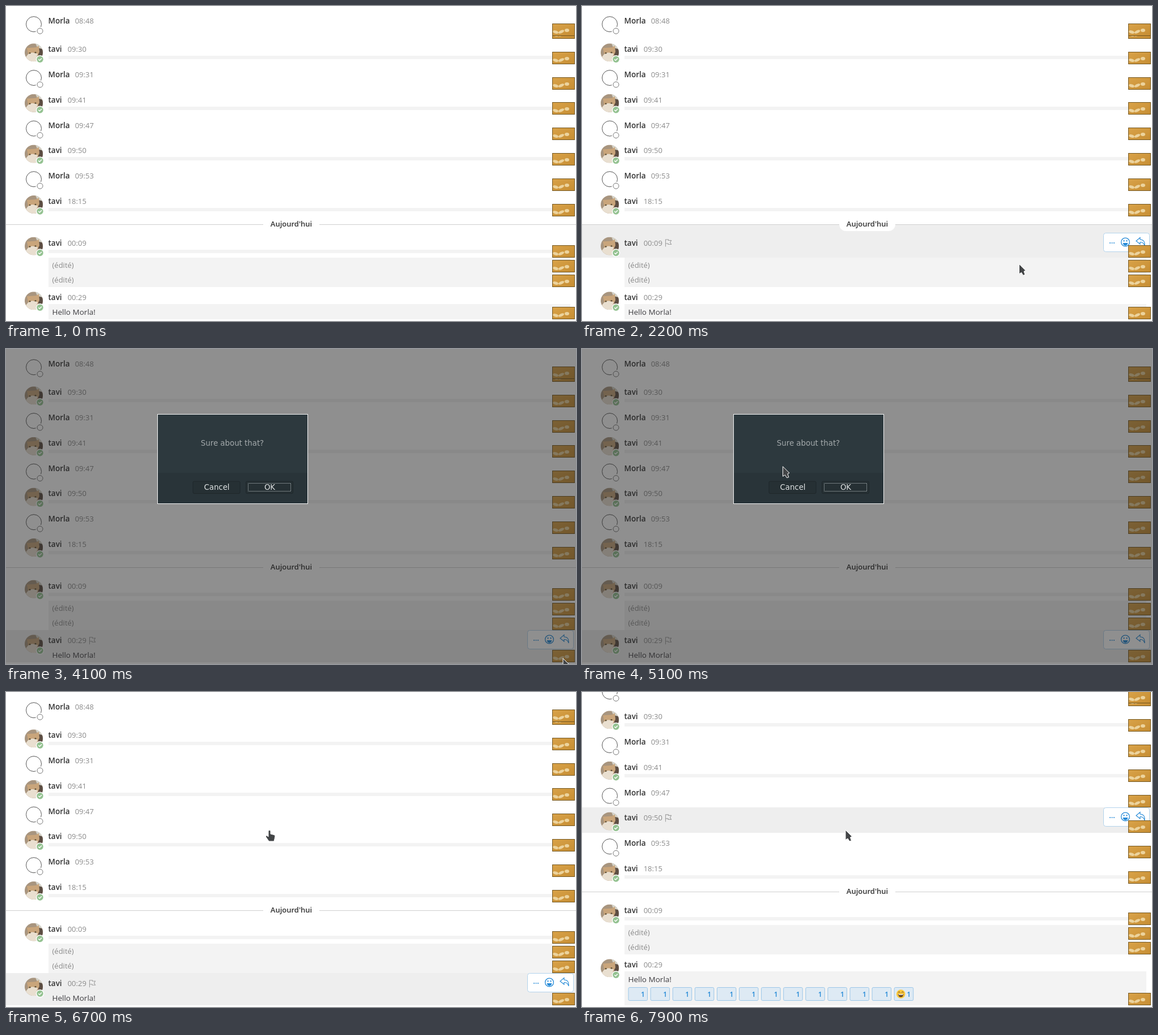
These frames come from a looping animation (1006 px wide and 557 px high, 8000 ms). An HTML page:

```html
<!DOCTYPE html>
<html lang="fr">
<head>
<meta charset="utf-8">
<title>Chat</title>
<style>
html, body { margin: 0; width: 100%; height: 100%; overflow: hidden; background: #fff; }
svg { display: block; width: 100%; height: 100%; }
text { font: 13px "Open Sans", "Noto Sans", sans-serif; fill: #8a8a8a; white-space: pre; }
.name { font-size: 13.5px; font-weight: 600; fill: #333; }
.body { font-size: 13.5px; fill: #3d3c40; }
.day { font-weight: 600; fill: #333; text-anchor: middle; }
.count { font-size: 12px; font-weight: 600; fill: #2389d7; text-anchor: middle; }
.dialog text { font: 13.33px "DejaVu Sans", sans-serif; fill: #dfe2e3; text-anchor: middle; }
.dialog .ask { fill: #a4aaac; }
</style>
</head>
<body>
<svg viewBox="0 0 1006 557" preserveAspectRatio="none">
  <defs>
    <clipPath id="round"><circle r="16"/></clipPath>
    <linearGradient id="gold" x2="1" y2="1">
      <stop offset="0" stop-color="#d9a248"/><stop offset="1" stop-color="#c68e34"/>
    </linearGradient>
    <g id="thumb">
      <rect x=".5" y=".5" width="39" height="21" fill="url(#gold)" stroke="#73561f"/>
      <g fill="#ecd39d">
        <ellipse cx="6" cy="15" rx="5" ry="2.6" transform="rotate(18 6 15)"/>
        <ellipse cx="16" cy="14.5" rx="5.5" ry="2.4" transform="rotate(-25 16 14.5)"/>
        <ellipse cx="26" cy="12" rx="4" ry="3"/>
      </g>
    </g>
    <g id="cat">
      <g clip-path="url(#round)">
        <rect x="-16" y="-16" width="32" height="32" fill="#a8957f"/>
        <path d="M3-16H16V-4L8-5Z" fill="#d5d4cb"/>
        <path d="M8-8L16-6V12L8 8Z" fill="#5d4e43"/>
        <path d="M-12-8L4-9L9-12L10-1L5 9L-9 9Z" fill="#c9a57b"/>
        <path d="M-10 3L-3 0L7 2L4 11L6 16H-13L-14 8Z" fill="#e9dfd0"/>
        <ellipse cx="-7" cy="1" rx="1.500" ry="1.200" fill="#5c5038"/>
        <ellipse cx="3" cy="0" rx="1.500" ry="1.200" fill="#5c5038"/>
      </g>
      <circle cx="11" cy="12" r="7.2" fill="#fff"/>
      <circle cx="11" cy="12" r="5.7" fill="#94c291"/>
      <path d="M8.2 12L10.3 14L14 10.2" fill="none" stroke="#fff" stroke-width="1.5"/>
    </g>
    <g id="ring">
      <circle r="13.5" fill="#fff" stroke="#555"/>
      <circle cx="11" cy="12" r="7.5" fill="#fff"/>
      <circle cx="11" cy="12" r="5" fill="#fff" stroke="#777"/>
    </g>
    <path id="flag" d="M147.500 7V-5.500H152.500V-4H157.500L155.500-.5L157.500 3H152V1.500H147.500" fill="none" stroke="#a0a0a0" stroke-width="1.100"/>
    <g id="tools" fill="none" stroke="#2389d7">
      <rect x="920.5" y="-17.5" width="81" height="33" rx="4" fill="#fff" stroke="#b3d3ec"/>
      <path d="M931 0h2M934.500 0h2M938 0h2" stroke-width="1.700"/>
      <circle cx="959" cy="-1.500" r="7.400" stroke-width="1.300"/>
      <path d="M955 .5H963Q962 4.300 959 4.300T955 .5Z" fill="#2389d7"/>
      <path d="M956.500-5v2.500M961.500-5v2.500" stroke-width="1.800"/>
      <path d="M985-9.500L978-3.500L985 2V-1.500Q991-2 993 5Q994-6 985-6Z" stroke-width="1.100"/>
    </g>
  </defs>
  <g id="page"></g>
  <g id="modal" class="dialog">
    <rect width="1006" height="557" fill="#242424" opacity=".51"/>
    <rect x="267.5" y="115.500" width="265" height="158" fill="#2d393e" stroke="#f4f5f5"/>
    <rect x="268" y="219" width="264" height="54" fill="#293439"/>
    <g fill="#263034" stroke="#1f272a">
      <rect x="330" y="234" width="83" height="21.500" rx="2"/>
      <rect x="423.500" y="234" width="83" height="21.500" rx="2"/>
    </g>
    <rect x="427.500" y="237.500" width="75" height="14" fill="none" stroke="#b9c0c2" stroke-dasharray="1" stroke-dashoffset=".5"/>
    <text class="ask" x="399.500" y="171">Sure about that?</text>
    <text x="372" y="249">Cancel</text>
    <text x="465.500" y="249">OK</text>
  </g>
  <g id="cursor" fill="#434547" stroke="#fff" stroke-linejoin="round">
    <path id="arrow" d="M0 0V17.500L4 15L7 20L10.500 19L8.500 13L11.500 11.500Z"/>
    <path id="hand" d="M-2 1.500Q0-1 2 1.500V7L8 8.500Q10 9 10 11L9 16L8 20H-1L-6.500 12Q-7.500 9.500-4.500 10L-2 12Z"/>
  </g>
</svg>
<script>
const LOOP = 8000, STEP = 100;
const DIALOG = 4100, CLOSED = 6700, AWAKE = 7100, REACT = 7300;
const CHIPS = 13, SCROLL = 33;
const $ = id => document.getElementById(id);
const rect = (x, y, w, h, fill, more = '') =>
  `<rect x="${x}" y="${y}" width="${w}" height="${h}" fill="${fill}" ${more}/>`;
const text = (cls, x, y, s) => `<text class="${cls}" x="${x}" y="${Math.round(y)}">${s}</text>`;
const use = (id, x, y, cls = '') => `<use class="${cls}" href="#${id}" x="${x}" y="${y}"/>`;

// Stack the messages from top to bottom.
const rows = [];
let flow = 8;
function add(kind, time, height, pad = 18.2) {
  rows.push({ kind, time, top: Math.round(flow), bottom: Math.round(flow + height), mid: flow + pad });
  flow += height;
}
'08:48 09:30 09:31 09:41 09:47 09:50 09:53 18:15'.split(' ')
  .forEach((time, i) => add(i % 2 ? 'cat' : 'ring', time, i ? 44.8 : 50));
flow = 387;
add('cat', '00:09', 58, 31.5);
add('edit', '00:12', 26, 13.5);
add('edit', '00:14', 26, 13.5);
add('cat', '00:29', 57);
const last = rows.at(-1);

function bar({ kind, top, bottom, mid }, isLast) {
  if (kind == 'ring') return '';
  const y = kind == 'edit' ? top : Math.round(mid + 12);
  return rect(75, y, 921, kind == 'edit' || isLast ? bottom - y : 6, '#f3f3f3', 'class="bar"');
}

function message(row) {
  const { kind, time, top, bottom, mid } = row;
  const back = bar(row, row == last) + rect(0, top, 1006, bottom - top, '#eee', 'class="shade"');
  if (kind == 'edit') return back + text('', 81.5, mid + 4.5, '(édité)');
  const [name, x] = kind == 'cat' ? ['tavi', 108.7] : ['Morla', 121.7];
  return back + use(kind, 49, mid + 6) + text('name', 74.5, mid + 5, name) + text('', x, mid + 5, time);
}

function hoverTools({ kind, time, mid }) {
  const mark = kind == 'edit' ? text('', 19, mid + 4.5, time) : use('flag', 0, mid);
  return `<g class="hover">${mark}${use('tools', 0, Math.round(mid))}</g>`;
}

function chip(_, i) {
  const x = 82 + i * 39.1;
  const face = i < CHIPS - 1 ? '' : `<g transform="translate(${x + 11.5} 567)">
    <circle r="7.800" fill="#fbc93d"/><path d="M-5 0H5Q4 5.500 0 5.500T-5 0Z" fill="#5f4020"/>
    <path d="M-4 1H4" stroke="#fff" stroke-width="1.500"/>
    <path d="M-5-2.500L-3-4L-1-2.500M1-2.500L3-4L5-2.500" fill="none" stroke="#5f4020"/></g>`;
  return `<g class="chip">${rect(x, 555.5, 33.5, 23, '#deeaf4', 'stroke="#9ac6e8" rx="2"')}
    ${face}${text('count', x + 25.5, 571.5, 1)}</g>`;
}

$('page').innerHTML = rows.map(message).join('') +
  '<path d="M0 386.500H454M553 386.500H1006" stroke="#cfcfcf"/>' +
  rect(454, 374, 99, 24, '#fff', 'rx="12"') + text('day', 503.5, 390, "Aujourd'hui") +
  text('body', 81.5, 546, 'Hello Morla!') +
  Array.from({ length: CHIPS }, chip).join('') +
  rows.map(hoverTools).join('') + use('thumb', 964, 36) + use('thumb', 964, 31) +
  rows.slice(1).map(r => use('thumb', 964, r.bottom - 22, 'thumb')).join('');

const all = cls => [...document.querySelectorAll('.' + cls)];
const chips = all('chip'), hovers = all('hover'), shades = all('shade');
const lastBar = all('bar').at(-1), lastThumb = all('thumb').at(-1);
const show = (el, on) => el.setAttribute('visibility', on ? 'visible' : 'hidden');

// Pointer strokes: first step, last step, where they end.
const line = (from, to, x, y) => ({ from, to, at: (p, [a, b]) => [a + (x - a) * p, b + (y - b) * p] });
const circle = (from, to) => ({ from, to, at: p => {
  const a = (73 + 302 * p) * Math.PI / 180;
  return [419.5 + 65.5 * Math.cos(a), 199 + 79 * Math.sin(a)];
} });
const strokes = [
  line(700, 1000, 598, 165), line(1300, 1400, 650, 315), line(1700, 1900, 735, 435),
  line(2200, 2500, 881, 520), line(2900, 2900, 975, 545), line(3100, 3100, 983, 547),
  line(4400, 4600, 439, 278), circle(4900, 5700), line(5800, 6000, 465, 244)
];

function pointer(t) {
  let pos = [540, -35];
  for (const { from, to, at } of strokes) {
    if (t < from) break;
    const steps = (to - from) / STEP + 1;
    pos = at(Math.min(1, (Math.floor((t - from) / STEP) + 1) / steps), pos);
  }
  return pos;
}

// The highlight trails the pointer and stays put while the dialog is up.
function hoveredRow(t, y) {
  if (t >= DIALOG && t < AWAKE) return rows.length - 1;
  const spot = t < DIALOG ? y - 12 : y;
  return rows.findIndex(r => spot >= r.top && spot < r.bottom);
}

function render(t) {
  const [x, y] = pointer(t);
  const hover = hoveredRow(t, y);
  const hand = (t >= 3100 && t < DIALOG) || (t >= CLOSED && t < AWAKE);
  const count = t < REACT ? 0 : Math.min(CHIPS, 1 + 2 * Math.floor((t - REACT) / STEP));
  const grow = count ? SCROLL : 0;
  $('page').setAttribute('transform', `translate(0 ${-grow})`);
  lastBar.setAttribute('height', 27 + grow);
  lastThumb.setAttribute('y', last.bottom - 22 + grow);
  chips.forEach((el, i) => show(el, i < count));
  hovers.forEach((el, i) => show(el, i == hover));
  shades.forEach((el, i) => show(el, i == hover));
  show($('modal'), t >= DIALOG && t < CLOSED);
  $('cursor').setAttribute('transform', `translate(${x} ${y})`);
  show($('arrow'), !hand);
  show($('hand'), hand);
}

const start = performance.now();
function tick() {
  render((performance.now() - start) % LOOP);
  requestAnimationFrame(tick);
}
tick();
</script>
</body>
</html>
```
